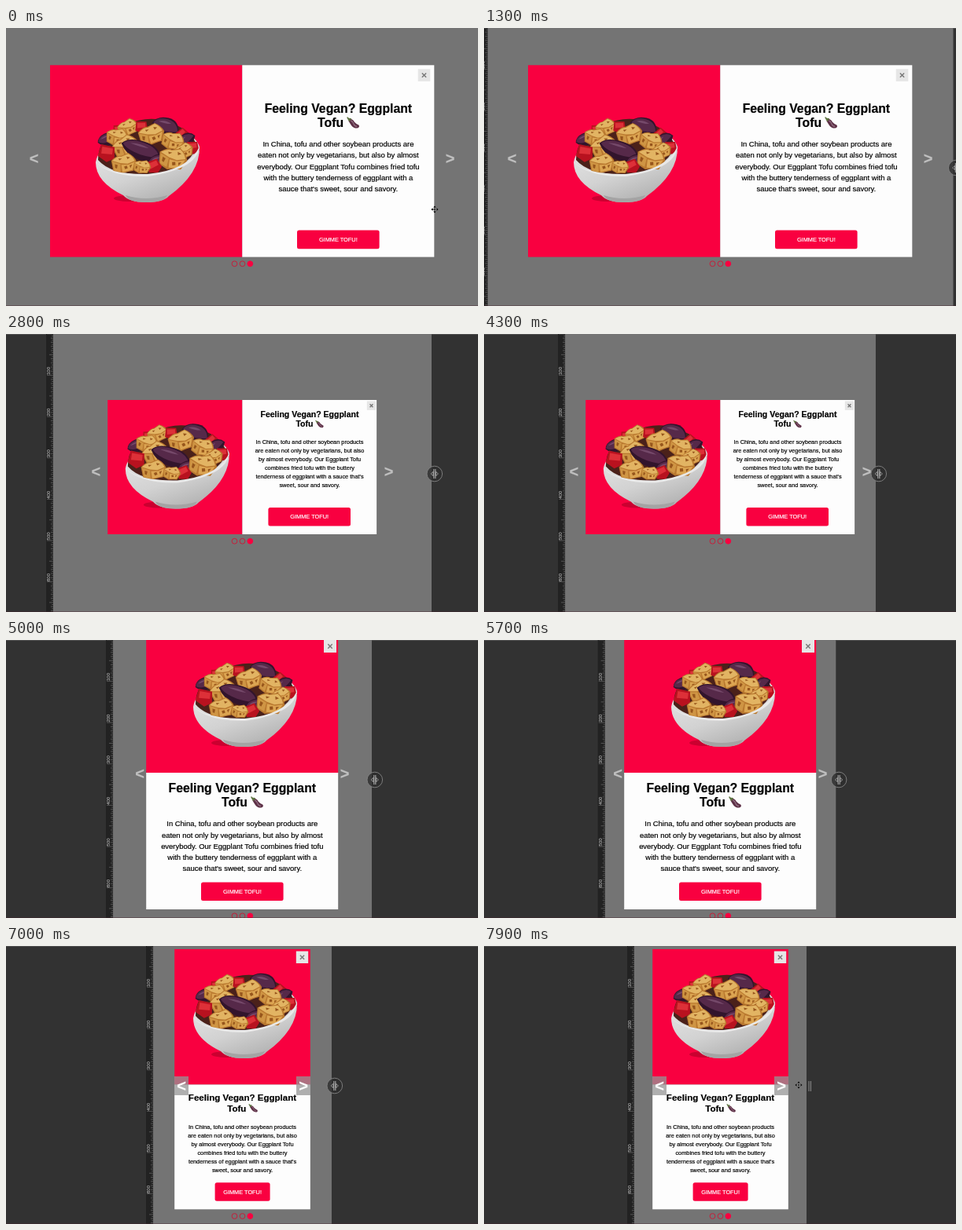
Write an HTML page that moves like this. It is 600 px wide and 354 px high and loops after 8000 ms.

```html
<!DOCTYPE html>
<html lang="en">
<head>
<meta charset="utf-8">
<title>Responsive popup</title>
<style>
html, body { margin: 0; width: 100%; height: 100%; overflow: hidden; background: #747474; }
svg { display: block; width: 600px; height: 354px; font-family: "Liberation Sans", Arial, sans-serif; }
text { text-anchor: middle; stroke-width: .18; }
</style>
</head>
<body>
<svg id="stage" viewBox="0 0 600 354"></svg>
<script>
const RED = '#f90040', SCALE = 0.526, LOOP = 8000;
const rect = (x, y, w, h, fill, rx = 0) =>
  `<rect x="${x}" y="${y}" width="${w}" height="${h}" rx="${rx}" fill="${fill}"/>`;
const path = (d, fill, more = '') => `<path d="${d}" fill="${fill}" ${more}/>`;
const line = (d, color, width) => path(d, 'none', `stroke="${color}" stroke-width="${width}"`);
const text = (x, y, size, str, fill = '#000', more = '') =>
  `<text x="${x}" y="${y}" font-size="${size}" fill="${fill}" stroke="${fill}" ${more}>${str}</text>`;

const wideLines = ['In China, tofu and other soybean products are',
  'eaten not only by vegetarians, but also by almost',
  'everybody. Our Eggplant Tofu combines fried tofu',
  'with the buttery tenderness of eggplant with a',
  'sauce that\'s sweet, sour and savory.'];
const narrowLines = ['In China, tofu and other soybean products',
  'are eaten not only by vegetarians, but also',
  'by almost everybody. Our Eggplant Tofu',
  'combines fried tofu with the buttery',
  'tenderness of eggplant with a sauce that\'s',
  'sweet, sour and savory.'];

// Food pieces
const piece = (x, y, sx, sy, turn, body) =>
  `<g transform="translate(${x} ${y}) rotate(${turn}) scale(${sx} ${sy})">${body}</g>`;
const tofu = (x, y, s, turn) => piece(x, y, s, s, turn,
  path('M-14-4Q-8-10-3-9L5-12Q12-8 14-2L10 8Q2 9-3 11L-12 8Z', '#b9782f') +
  path('M-13-4Q-7-9-3-8L5-11Q10-8 12-3L4 0-4-1Z', '#e2b463') +
  path('M-13-3L-4 0-4 9-11 7Z', '#cf9544') + path('M-3 1L5 1 12-2 9 7-2 9Z', '#dca552') +
  path('M-10 0l3 1-1 4-2-1zM0 3l3-1 1 3-3 1zM6 2l3-1-2 4zM-6-6l4 0-3 2zM3-8l4 1-3 2z', '#97561c'));
const aubergine = (x, y, w, h, turn) => piece(x, y, w, h, turn,
  path('M-1 0Q-.8-.9 0-1T1 .25Q.6 1 0 1T-1 0Z', '#32142c') +
  path('M-.92-.1Q-.7-.85 0-.86T.9 .1Q.2 .55-.3 .4T-.92-.1Z', '#562949') +
  path('M-.6-.35Q-.2-.75 .3-.5Q0-.3-.6-.35Z', '#75496a'));
const pepper = (x, y, s, turn) => piece(x, y, s, s, turn,
  path('M-9-6L5-9 10 2 4 9-7 7Z', '#b8121f') + path('M-7-4L4-7 6-1-5 3Z', '#dd3038'));

const bowl = `<ellipse cx="157" cy="217" rx="20" ry="4" fill="#cb0030"/>` +
  path('M114 171Q119 141 178 133T246 151Q247 185 207 214Q200 222 178 222Q157 222 149 213Q114 196 114 171Z', 'url(#china)') +
  path('M117 168Q117 138 150 124T205 120Q236 128 243 151Q230 182 181 187Q133 187 117 168Z', '#4b211a') +
  pepper(143, 130, 0.8, 10) + aubergine(128, 142, 12, 8, -20) + tofu(155, 127, 0.95, -14) +
  tofu(141, 139, 1, 10) + pepper(172, 126, 0.9, 15) + aubergine(203, 126, 18, 12, 18) +
  pepper(224, 135, 0.8, -25) + tofu(185, 136, 1.2, -8) + aubergine(227, 144, 15, 8, -35) +
  tofu(212, 144, 1.05, 20) + pepper(237, 152, 0.9, 12) + tofu(152, 151, 1.2, -18) +
  pepper(128, 159, 1.2, 25) + aubergine(172, 156, 27, 12, 20) + tofu(226, 157, 0.9, -14) +
  aubergine(193, 170, 13, 9, -15) + tofu(212, 167, 1.3, 14) + tofu(150, 173, 1.15, -2) +
  pepper(188, 176, 1, -8) + tofu(173, 177, 0.8, 12) +
  path('M114 171Q133 187 180 186Q232 181 246 151Q243 180 180 189Q134 190 114 171Z', '#e9e9e9') +
  path('M152 213Q178 221 205 213Q202 222 178 222Q156 222 152 213Z', '#a4a4a4');

const emoji = (x, y, s) => `<g transform="translate(${x} ${y}) scale(${s})">
  ${path('M-.3-.3Q-.06-.38.1-.08Q.22.06.44.16Q.56.3.38.4Q.08.47-.14.2Q-.26.02-.38-.18Z', '#5e3147')}
  ${path('M-.18-.2Q0-.1.05.08T.3.27', 'none', 'stroke="#937083" stroke-width=".08"')}
  ${path('M-.52-.46L-.45-.5-.35-.4-.14-.38-.2-.26-.3-.12-.42-.27Z', '#5d7340')}</g>`;

function card(c) {
  const [px, py, pw, ph] = c.photo, [wx, wy, ww, wh] = c.panel, [bx, by, bw, bh] = c.button;
  const [kx, ky, ks] = c.close, mid = kx + ks / 2, r = ks * 0.17, ym = ky + ks / 2;
  const arrow = (x, sign) => (c.boxed ? rect(x - 9, c.arrowY - 12, 18, 24, 'rgba(150,150,150,.75)') : '') +
    text(x, c.arrowY + 6.5, 20, sign, c.boxed ? '#fff' : '#c0c0c0', 'font-weight="bold"');
  const dots = [290.5, 300.5, 310.3].map((x, i) =>
    `<circle cx="${x}" cy="${c.dotY}" r="3.4" fill="${i > 1 ? RED : 'none'}" stroke="${i > 1 ? RED : '#d01535'}" stroke-width=".9"/>`).join('');
  const [ts, ty] = c.title, [ls, ly, gap] = c.body;
  return rect(px, py, pw, ph, RED) + rect(wx, wy, ww, wh, '#fdfdfd') +
    `<g transform="translate(${c.bowl})">${bowl}</g>` +
    rect(kx, ky, ks, ks, '#e6e6e6') +
    line(`M${mid - r} ${ym - r}l${2 * r} ${2 * r}m0 ${-2 * r}l${-2 * r} ${2 * r}`, '#777', 1.4) +
    text(c.cx, ty, ts, 'Feeling Vegan? Eggplant', '#000', 'font-weight="bold"') +
    text(c.cx - ts * 0.62, ty + ts * 1.17, ts, 'Tofu', '#000', 'font-weight="bold"') +
    emoji(c.cx + ts * 1.2, ty + ts * 0.84, ts) +
    c.lines.map((s, i) => text(c.cx, ly + i * gap, ls, s)).join('') +
    rect(bx, by, bw, bh, RED, 2.5) +
    text(bx + bw / 2, by + 14.3, 7.37, 'GIMME TOFU!', '#fff') +
    dots + arrow(c.arrows[0], '&lt;') + arrow(c.arrows[1], '&gt;');
}

// Layouts from the widest viewport to the narrowest; each applies up to its left inset
const layouts = [
  { until: 31, photo: [56, 47.3, 244.3, 244.3], panel: [300.3, 47.3, 244, 244.3], bowl: '0 0', cx: 422.4,
    close: [523.7, 52.3, 15.6], title: [15.78, 107.8], body: [9.45, 151.2, 14.2], lines: wideLines,
    button: [370, 257.6, 104.6, 23.6], dotY: 300.2, arrows: [35.5, 564.7], arrowY: 166.3 },
  { until: 116, photo: [129.2, 84, 171.2, 171], panel: [300.4, 84, 170.7, 171], bowl: '37.8 .5', cx: 386,
    close: [458.8, 85.5, 11.4], title: [10.52, 106.1], body: [7.37, 140.2, 11.03], lines: narrowLines,
    button: [333.4, 221, 104.6, 23.4], dotY: 263.8, arrows: [114.3, 486.7], arrowY: 175.6 },
  { until: 182, photo: [178.2, 0, 244, 169], panel: [178.2, 169, 244, 174], bowl: '124 -86', cx: 300.3,
    close: [404, 0, 16], title: [15.78, 193.8], body: [9.45, 237.4, 14.2], lines: wideLines,
    button: [248, 308.5, 104.6, 23.6], dotY: 351.3, arrows: [170, 430.7], arrowY: 170.6 },
  { until: 999, photo: [214.2, 4, 172.6, 172.5], panel: [214.2, 176.5, 172.6, 158.8], bowl: '124 -79', cx: 300.5,
    close: [368.8, 6.6, 15.4], title: [11.55, 197.1], body: [7.37, 232.8, 11.03], lines: narrowLines,
    button: [265.6, 301.2, 70, 23.6], dotY: 344, arrows: [223, 378], arrowY: 178, boxed: true }
];

// Dark surroundings with a thin light top edge
const shade = x => rect(x, 0, 600, 354, '#323232') + rect(x, 0, 600, 0.8, '#585858');
let ruler = shade(-600) + rect(-9, 0, 9, 354, '#222');
let ticks = '';
for (let n = 0; n * 5 * SCALE < 354; n++) {
  const len = n % 20 == 0 ? 8 : n % 10 == 0 ? 5 : n % 2 ? 1.8 : 3;
  ticks += `M0 ${(n * 5 * SCALE).toFixed(2)}h${-len}`;
}
ruler += line(ticks, '#888', 0.5);
for (let n = 1; n < 7; n++)
  ruler += text(0, 0, 6, n * 100, '#a0a0a0', `transform="translate(-3.6 ${n * 100 * SCALE - 5.6}) rotate(-90)"`);

const edge = shade(0) + line('M3 172v13m2.4-13v13', '#999', 0.9);
const grip = '<circle r="9.8" fill="rgba(45,45,45,.8)" stroke="#858585" stroke-width=".9"/>' +
  path('M-4.6 0l2.8-2.6v5.2zM4.6 0l-2.8-2.6v5.2z', '#222', 'stroke="#ccc" stroke-width=".7"') +
  line('M-1-6v12M1-6v12', '#ccc', 0.8);
const pointer = line('M-4 0h8M0-4v8', '#fff', 2.2) + line('M-4 0h8M0-4v8', '#000', 1.1) +
  path('M-4.5 0l2-1.8v3.6zM4.5 0l-2-1.8v3.6zM0-4.5l1.8 2h-3.6zM0 4.5l1.8-2h-3.6z', '#000');

const stage = document.getElementById('stage');
const group = (id, body) => `<g id="${id}">${body}</g>`;
stage.innerHTML = `<defs><linearGradient id="china" x1=".2" x2=".55" y1=".3" y2="1">
  <stop offset="0" stop-color="#e0e0e0"/><stop offset=".5" stop-color="#d2d2d2"/><stop offset="1" stop-color="#b4b4b4"/>
  </linearGradient></defs>` + rect(0, 0, 600, 354, '#747474') +
  layouts.map((c, i) => group('card' + i, card(c))).join('') +
  group('left', ruler) + group('right', edge) + rect(0, 353, 600, 1, 'rgba(70,35,45,.4)') +
  group('grip', grip) + group('pointer', pointer);
const $ = id => document.getElementById(id);
const cards = layouts.map((c, i) => $('card' + i));
const move = (id, x, y) => $(id).setAttribute('transform', `translate(${x.toFixed(2)} ${y.toFixed(2)})`);
const show = (el, on) => el.setAttribute('display', on ? 'inline' : 'none');

// Time and left inset of the viewport while its edge is dragged
const drag = [[1000, 0], [1800, 12], [2100, 29], [2700, 57], [2800, 60], [3600, 62], [4300, 103], [4500, 112],
  [5000, 136], [5400, 145], [6300, 171], [6400, 175], [7200, 191]];
// Time and place of the free pointer
const hover = [[100, 545, 231], [700, 598, 178], [7300, 413, 178], [7800, 400, 177]];

function at(keys, t, k) {
  const i = keys.findIndex(p => p[0] > t);
  if (i < 0) return keys[keys.length - 1][k];
  if (i == 0) return keys[0][k];
  const a = keys[i - 1], b = keys[i];
  return a[k] + (b[k] - a[k]) * (t - a[0]) / (b[0] - a[0]);
}

function draw() {
  const t = performance.now() % LOOP, inset = at(drag, t, 1);
  const dragging = t >= 1000 && t < 7300, right = 601 - inset;
  const active = layouts.findIndex(c => inset < c.until);
  cards.forEach((el, i) => show(el, i == active));
  move('left', inset, 0);
  move('right', right, 0);
  move('grip', right + 3.8, 178);
  const keys = t < 1000 ? hover.slice(0, 2) : hover.slice(2);
  move('pointer', at(keys, t, 1), at(keys, t, 2));
  show($('grip'), dragging);
  show($('pointer'), !dragging);
  requestAnimationFrame(draw);
}
draw();
</script>
</body>
</html>
```
